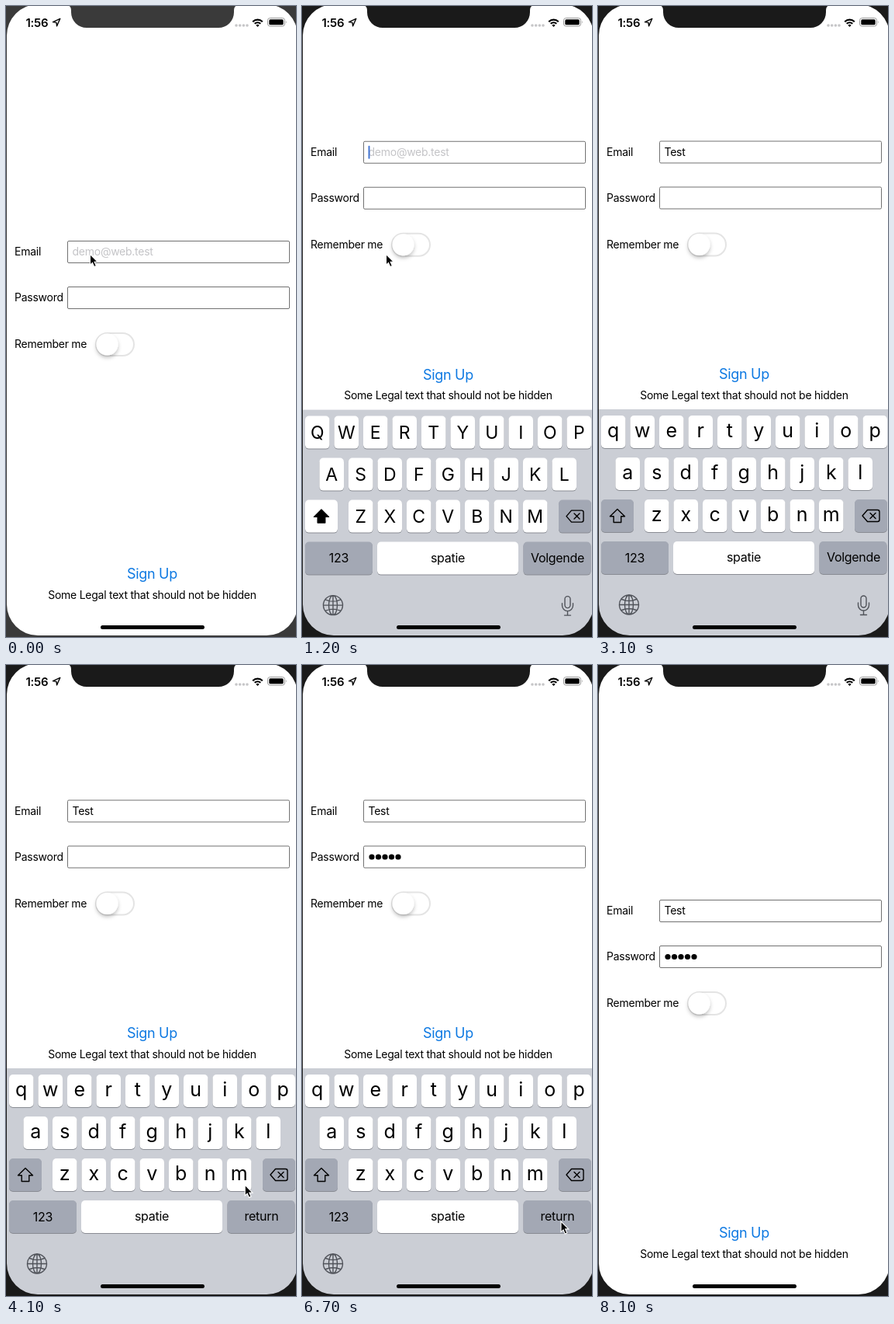
Recreate the animation shown at these times as an HTML page. Size 374 by 812 pixels, loop 8.9 s.

```html
<!DOCTYPE html>
<html lang="en">
<head>
<meta charset="utf-8">
<title>Sign-up form avoiding the keyboard</title>
<style>
  html, body { margin: 0; width: 100%; height: 100%; overflow: hidden; background: #fff; }
  svg { display: block; width: 374px; height: 812px; }
  text { font: 14px Inter, "Liberation Sans", sans-serif; letter-spacing: -.018em; white-space: pre; }
  .key text { text-anchor: middle; font-size: 16px; }
  .key .letter { font-size: 23px; letter-spacing: 0; }
  .key .small { font-size: 25px; }
  .line { fill: none; stroke: #000; stroke-width: 1.4; stroke-linejoin: round; stroke-linecap: round; }
  .soft { stroke: #50535a; }
</style>
</head>
<body>
<svg id="stage" viewBox="0 0 374 812"></svg>
<script>
const LOOP = 8900, STEP = 100;
const KEYBOARD = 291, SAFE_AREA = 34;
const GRAY = '#a3a8b4';
const stage = document.getElementById('stage');
const pen = document.createElement('canvas').getContext('2d');

const emailTimes = [1800, 2000, 2300, 2600];
const passwordTimes = [4700, 4900, 5100, 5200, 5400];
const pointerPath = [
  [0, 108.5, 319.5], [3100, 108.5, 319.5], [3300, 356, 722], [3400, 336, 720],
  [3900, 336, 720], [4400, 266.5, 593], [5800, 266.5, 593], [6500, 334, 716],
  [7600, 334, 716], [7800, 280, 680], [8000, 205, 721], [LOOP, 205, 721]
];

const within = (t, from, to) => t >= from && t < to;
const typed = (word, times, t) => word.slice(0, times.filter(at => at <= t).length);

// Critically damped spring, 0 to 1
function spring(ms) {
  const x = Math.max(0, ms) * Math.sqrt(1000 / 3) / 1000;
  return 1 - (1 + x) * Math.exp(-x);
}

function textWidth(word) {
  pen.font = '14px Inter, "Liberation Sans", sans-serif';
  return pen.measureText(word).width - word.length * .25;
}

const text = (x, y, word, attrs = '') => `<text x="${x}" y="${y}" ${attrs}>${word}</text>`;
const rect = (x, y, w, h, r, attrs) =>
  `<rect x="${x}" y="${y}" width="${w}" height="${h}" rx="${r}" ${attrs}/>`;
const path = (d, attrs = '') => `<path d="${d}" ${attrs}/>`;
const group = (y, content, attrs = '') => `<g transform="translate(0 ${y})" ${attrs}>${content}</g>`;
const field = y => rect(79.5, y, 286, 28, 1.5, 'fill="#fff" stroke="#717171"');
const caret = (x, y) => rect(x, y, 2, 17, 1, 'fill="#4577d4"');

function key(x, y, w, fill, content) {
  return rect(x, y + 1, w, 42, 5, 'fill="#898c93"') + rect(x, y, w, 42, 5, `fill="${fill}"`) + content;
}

function keyboard(t) {
  const upper = t < emailTimes[0];
  const next = t < 3600;
  const pressed = within(t, 3500, 3600) || within(t, 6600, 6700);
  const rows = [['qwertyuiop', 4], ['asdfghjkl', 22.5], ['zxcvbnm', 60]];
  const letters = rows.map(([row, left], r) => [...row].map((c, i) => {
    const x = left + i * 37.5, y = 8 + r * 54;
    const label = text(x + 15.75, y + (upper ? 29.5 : 28), upper ? c.toUpperCase() : c,
      `class="letter${upper ? '' : ' small'}"`);
    return key(x, y, 31.5, '#fff', label);
  }).join('')).join('');
  const arrow = path('M25 128.5l9.5 9.3h-4.7v7.7h-9.6v-7.7h-4.7z',
    `class="line" ${upper ? 'style="fill:#000"' : ''}`);
  const erase = path('M347.5 129.5h13q2.5 0 2.5 2.5v10q0 2.5-2.5 2.5h-13l-6.5-7.5zM351 133.5l7 7m0-7l-7 7', 'class="line"');
  const globe = path('M52.5 251.5a12.5 12.5 0 1 1-25 0a12.5 12.5 0 1 1 25 0z'
    + 'M45.5 251.5a5.5 12.5 0 1 1-11 0a5.5 12.5 0 1 1 11 0z'
    + 'M40 239v25M27.5 251.5h25M30.5 244.5q9.5 4 19 0M30.5 258.5q9.5-4 19 0', 'class="line soft"');
  const mic = rect(339, 240, 7, 15, 3.5, 'class="line soft"')
    + path('M335.5 249v3a7 7 0 0 0 14 0v-3M342.5 259v5.5M338.5 264.5h8', 'class="line soft"');
  return rect(0, 0, 376, KEYBOARD + 2, 0, 'fill="#cbced5"') + letters
    + key(4, 116, 42, upper ? '#fff' : GRAY, arrow)
    + key(331, 116, 42, GRAY, erase)
    + key(4, 170, 87, GRAY, text(47.5, 196.5, '123'))
    + key(97, 170, 182, '#fff', text(188, 196, 'spatie'))
    + key(285.5, 170, 87, pressed ? '#fff' : GRAY, text(329.5, 196, next ? 'Volgende' : 'return'))
    + globe + (next ? mic : '');
}

function form(t) {
  const email = typed('Test', emailTimes, t);
  const password = typed('testt', passwordTimes, t);
  const dots = t < 5900 ? Math.max(0, password.length - 1) : password.length;
  let out = text(11, 321, 'Email') + field(302.5)
    + text(11, 380, 'Password') + field(361.5) + text(11, 440, 'Remember me')
    + text(85.5, 321, email || 'demo@web.test', email ? '' : 'fill="#c4c4c7"');
  for (let i = 0; i < dots; i++) out += `<circle cx="${90 + i * 8.5}" cy="375.5" r="3.6"/>`;
  if (dots < password.length) out += text(86 + dots * 8.5, 380, password.at(-1));

  const blinkedOff = within(t, 2900, 3300) || within(t, 4000, 4300) || within(t, 6300, 6800);
  if (within(t, 800, 6800) && !blinkedOff) {
    out += t < 3600
      ? caret(85.5 + textWidth(email), 308)
      : caret(85.5 + dots * 8.5 + (dots < password.length ? 5 : 0), 367);
  }
  return out + rect(116, 421, 49, 29, 14.5, 'fill="#fff" stroke="#e4e4e4" stroke-width="2"')
    + '<circle cx="130.5" cy="435.5" r="14" fill="#fff" filter="url(#knob)"/>';
}

function footer(t) {
  const dim = within(t, 8000, 8100) ? .3 : 1;
  return text(188.5, 737, 'Sign Up', `text-anchor="middle" fill="#0c78e2" opacity="${dim}" style="font-size:18px"`)
    + text(188.5, 762.5, 'Some Legal text that should not be hidden', 'text-anchor="middle"');
}

function statusBar() {
  const signal = [297, 301.7, 306.4, 311].map(x => `<circle cx="${x}" cy="25" r="1.8" fill="#c6c6c8"/>`).join('');
  return text(25.5, 26.5, '1:56', 'style="font-size:15px;font-weight:600"')
    + path('M69.8 16.3L60.5 20.6L65 21.4L65.6 25.8Z', 'class="line"') + signal
    + path('M318.2 20.2a9.2 9.2 0 0 1 12.6 0M320.7 22.8a5.6 5.6 0 0 1 7.6 0', 'fill="none" stroke="#000" stroke-width="2.2"')
    + path('M322.4 24.7a3.2 3.2 0 0 1 4.2 0l-2.1 2.2z')
    + rect(337.5, 15.5, 22, 10.5, 3, 'fill="none" stroke="#999"')
    + rect(339.3, 17.3, 18.4, 7, 1.6, '') + path('M361 19q1.6 1.7 0 3.6z', 'fill="#999"');
}

function bezel(t) {
  const color = t < 600 ? '#3a3a3a' : '#1a1a1a';
  const screen = 'M41-2H336a40 40 0 0 1 40 40V770a40 40 0 0 1-40 40H41a40 40 0 0 1-40-40V38a40 40 0 0 1 40-40z';
  const notch = 'M78-1q6 0 6 7v2a20 20 0 0 0 20 20H274a20 20 0 0 0 20-20v-2q0-7 6-7z';
  return path('M0 0H374V812H0z' + screen, `fill="${color}" fill-rule="evenodd"`)
    + path(notch, `fill="${color}"`) + rect(122, 797, 134, 5, 2.5, '');
}

function pointer(t) {
  if (within(t, 1800, 3200) || t >= 8100) return '';
  const i = pointerPath.findIndex(p => p[0] > t);
  const [t0, x0, y0] = pointerPath[i - 1], [t1, x1, y1] = pointerPath[i];
  const k = (t - t0) / (t1 - t0);
  return `<g transform="translate(${x0 + (x1 - x0) * k} ${y0 + (y1 - y0) * k})">`
    + path('M0 0V13.6L3 10.9L5.2 16L7.8 14.9L5.6 9.9H9.8Z', 'stroke="#fff" stroke-width="1.1"') + '</g>';
}

function render(t) {
  const shown = spring(t - 738) - spring(t - 6770);
  const lift = shown * (KEYBOARD - SAFE_AREA);
  stage.innerHTML = `<defs><filter id="knob" x="-50%" y="-50%" width="200%" height="200%">
      <feDropShadow dx="0" dy="3" stdDeviation="2.5" flood-opacity=".25"/></filter></defs>`
    + rect(0, 0, 374, 812, 0, 'fill="#fff"')
    + group(-lift / 2, form(t)) + group(-lift, footer(t))
    + (shown > .0005 ? group(810 - KEYBOARD * shown, keyboard(t), 'class="key"') : '')
    + statusBar() + bezel(t) + pointer(t);
}

let last = -1;
const start = performance.now();
function tick() {
  const t = Math.floor((performance.now() - start) % LOOP / STEP) * STEP;
  if (t !== last) render(last = t);
  requestAnimationFrame(tick);
}
tick();
</script>
</body>
</html>
```
